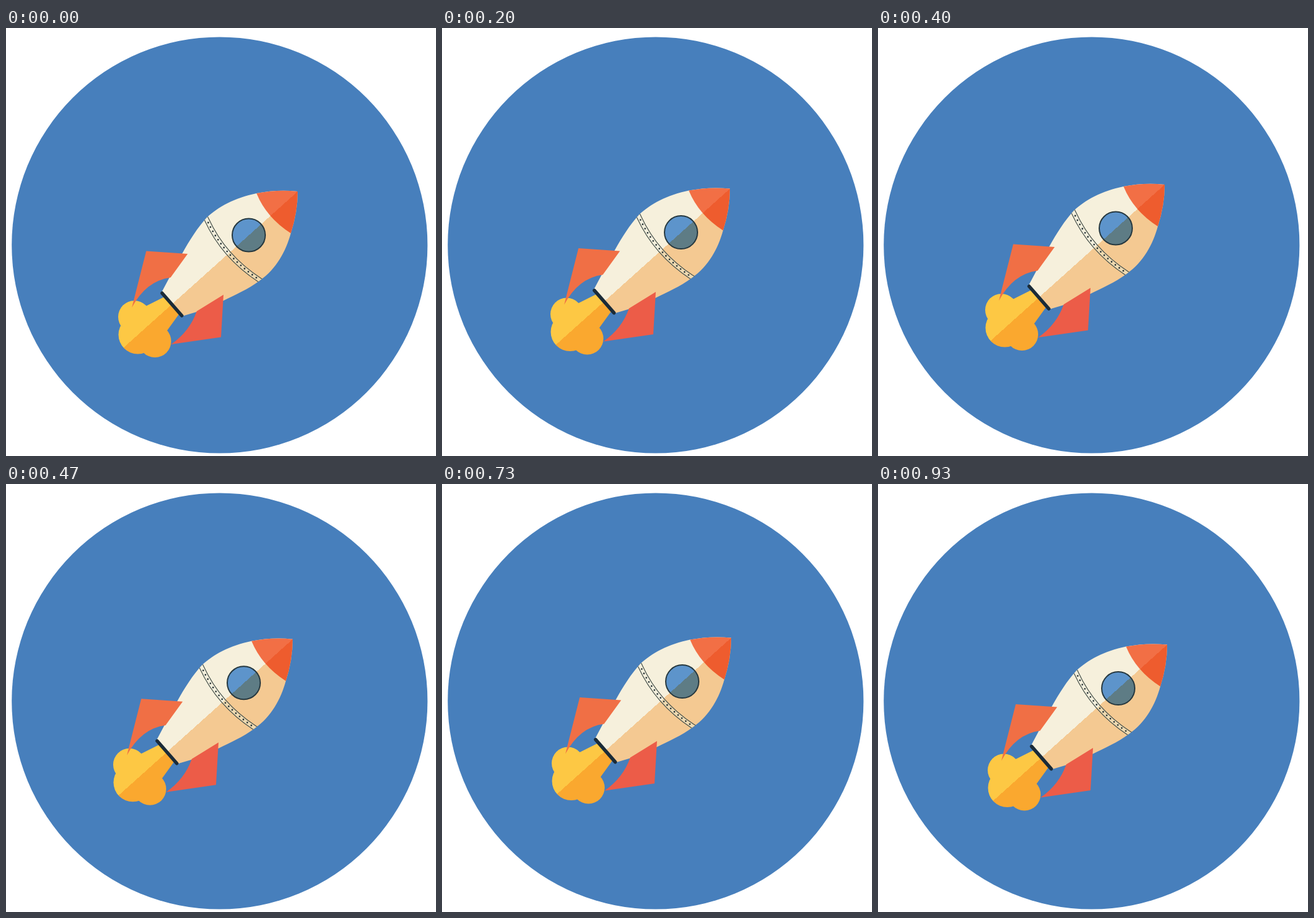
An HTML page with a canvas for the animation above (0.99 s loop, 690 by 686 pixels).

```html
<!DOCTYPE html>
<html lang="en">
<head>
<meta charset="utf-8">
<title>Rocket</title>
<style>
  html, body { margin: 0; width: 100%; height: 100%; overflow: hidden; background: #fff; }
  canvas { display: block; }
</style>
</head>
<body>
<canvas id="stage" width="690" height="686"></canvas>
<script>
const ctx = document.getElementById('stage').getContext('2d');
const LOOP = 990, STEPS = 15;
const STEP_X = 2, STEP_Y = 2.2;

// Keyframes: [step, displacement in grid units]
const driftX = [[0, 0], [3, -3], [6, -4], [9, -3], [12, -2], [15, -2]];
const driftY = [[0, 0], [3, -2], [10, -9], [12, -6], [15, 0]];

const body = new Path2D(`M468 262 Q435 258.5 402 265 C367 272 340 287 322 304
  C308 319 294 341 283 361 L250 423 L284 461.5 L306 455 L350 436.5
  C367 428 388 419 407 405 C434 386 449 358 457 329 Q468 295 468 262Z`);
const nose = new Path2D('M468 262 Q435 258.5 402 265 Q418 304 457 329 Q468 295 468 262Z');
const band = new Path2D('M319.5 302 L322 307 Q349 366 407 404 L412 407');
const rivets = new Path2D('M324.5 312 Q350 365 405 402.5');
const nozzle = new Path2D('M250.5 425 L282 461');
const leftFin = new Path2D('M225 357.5 L291.5 362 L264 400 Q225 405 202 448Z');
const rightFin = new Path2D('M349 427.5 L345 495.5 L265 507 Q295 486 306 454Z');
const porthole = circle(389.5, 332, 26.5);
const flame = [
  circle(206, 463, 26), circle(211.5, 491.5, 31), circle(239, 502, 26),
  new Path2D('M256 430 L224 446 L220 500 L257 487 L278 458Z')
];

function circle(x, y, r) {
  const path = new Path2D();
  path.arc(x, y, r, 0, 2 * Math.PI);
  return path;
}

// Two flat tones meeting along the rocket's long axis
function twoTone(light, dark) {
  const g = ctx.createLinearGradient(287, 60, 649, 464);
  g.addColorStop(0.5, light);
  g.addColorStop(0.5, dark);
  return g;
}

const tones = {
  body: twoTone('#f6f0dc', '#f4c992'),
  band: twoTone('#f3efdc', '#eed9b0'),
  nose: twoTone('#f26f45', '#ee5c2e'),
  glass: twoTone('#5d94cb', '#5e7c85'),
  flame: twoTone('#fdc844', '#faa82f')
};

function fill(path, style) {
  ctx.fillStyle = style;
  ctx.fill(path);
}

function stroke(path, style, width) {
  ctx.strokeStyle = style;
  ctx.lineWidth = width;
  ctx.stroke(path);
}

function drift(keys, step) {
  const i = keys.findIndex(key => key[0] > step);
  const [[s0, v0], [s1, v1]] = [keys[i - 1], keys[i]];
  return Math.round(v0 + (v1 - v0) * (step - s0) / (s1 - s0));
}

function drawRocket() {
  flame.forEach(part => fill(part, tones.flame));
  fill(body, tones.body);

  ctx.save();
  ctx.clip(body);
  stroke(band, '#46504a', 8.2);
  stroke(band, tones.band, 5.8);
  ctx.lineCap = 'round';
  ctx.setLineDash([0, 7.9]);
  stroke(rivets, '#2b373a', 2.8);
  ctx.restore();

  fill(nose, tones.nose);
  fill(porthole, tones.glass);
  stroke(porthole, '#26383f', 2);
  fill(leftFin, '#f06f45');
  fill(rightFin, '#ec5c48');
  ctx.lineCap = 'round';
  stroke(nozzle, '#1a2b38', 5.5);
}

function render(now) {
  // Tick times fall on whole hundredths of a second
  const time = now % LOOP;
  let step = STEPS - 1;
  while (Math.round(step * 6.66) * 10 > time) step--;

  ctx.fillStyle = '#fff';
  ctx.fillRect(0, 0, 690, 686);
  fill(circle(342.8, 348, 333.6), '#477fbc');
  ctx.save();
  ctx.translate(drift(driftX, step) * STEP_X, drift(driftY, step) * STEP_Y);
  drawRocket();
  ctx.restore();
  requestAnimationFrame(render);
}

render(performance.now());
</script>
</body>
</html>
```
